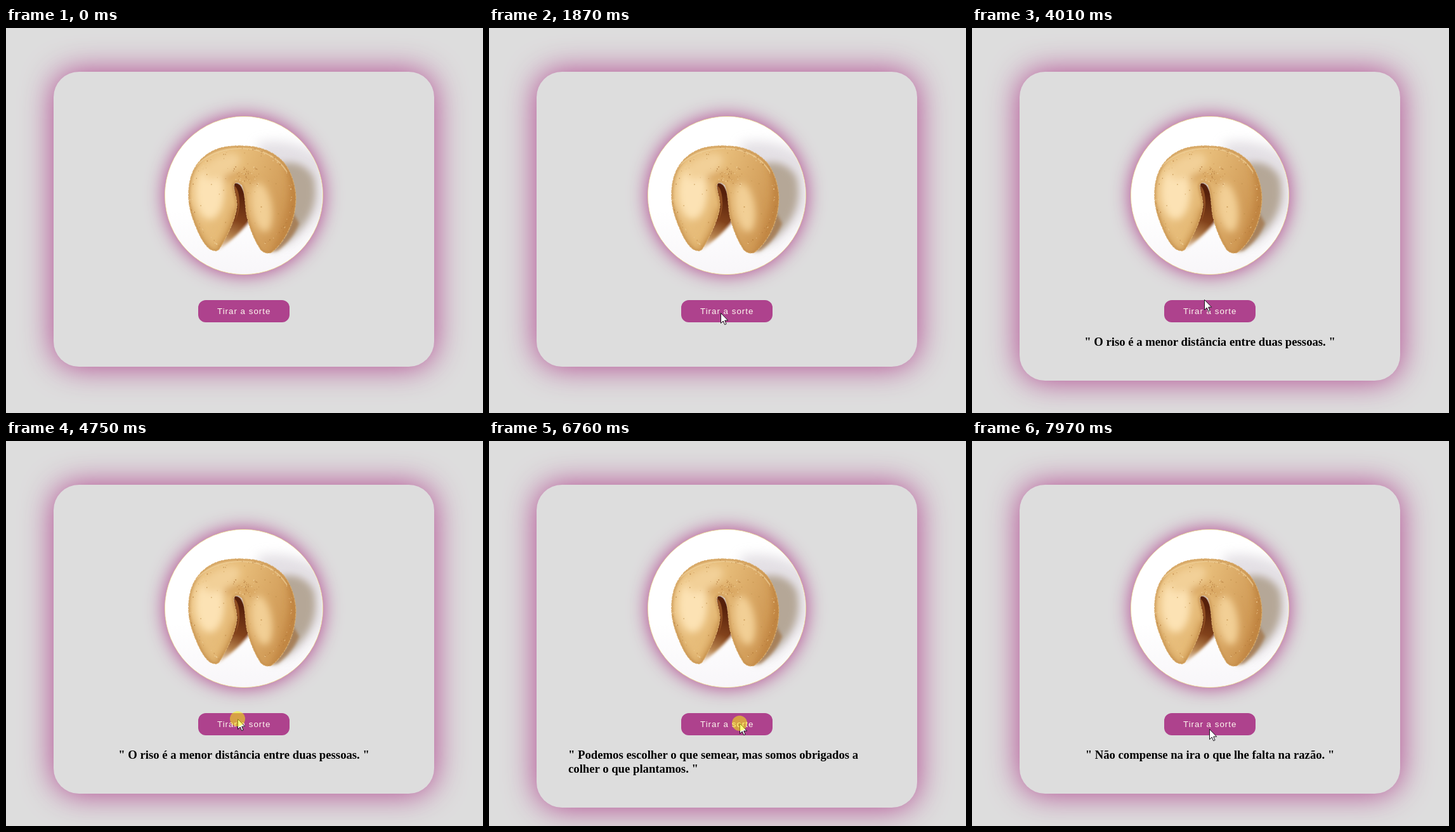
Animation, 752 px wide and 607 px high, one loop 8000 ms. Source, as an HTML page:

```html
<!DOCTYPE html>
<html lang="pt">
<head>
<meta charset="utf-8">
<title>Biscoito da sorte</title>
<style>
  html, body { margin: 0; width: 752px; height: 607px; overflow: hidden; background: #ddd; }
  body { position: relative; }
  .card {
    position: absolute; left: 75px; top: 69px; width: 600px; min-height: 465px;
    box-sizing: border-box; padding: 70px 50px 50px;
    display: flex; flex-direction: column; align-items: center;
    border-radius: 40px; background: #ddd; box-shadow: 0 0 50px #b0428d;
  }
  .plate {
    width: 250px; height: 250px; box-sizing: border-box; flex: none;
    border: 1px solid #eedd9a; border-radius: 50%; overflow: hidden;
    background: #fff; box-shadow: 0 0 30px #b0428d;
  }
  .plate svg { display: block; width: 248px; height: 248px; }
  .button {
    width: 144px; height: 35px; margin: 40px 0 20px; flex: none;
    box-sizing: border-box; padding-left: 30px; border-radius: 12px;
    background: #ae428d; color: #fffaf0; white-space: nowrap;
    font: 13.333px/35px "Liberation Sans", Arial, sans-serif; letter-spacing: 1px;
  }
  .quote {
    margin: 0; color: #000; white-space: nowrap;
    font: bold 18.72px/22px "Liberation Serif", "Times New Roman", serif;
  }
  .quote.long { width: 500px; }
  #pointer { position: absolute; left: 0; top: 0; overflow: visible; }
</style>
</head>
<body>
<div class="card">
  <div class="plate">
    <svg viewBox="251 140 248 248">
      <defs>
        <path id="shape" d="M328 351 C318 350 308 334 301 317 C292 296 287 279 288 258
          C289 234 297 214 316 200 C332 188 352 185 374 186 C399 186 420 194 436 210
          C449 224 456 246 457 267 C457 289 451 309 443 324 C436 337 427 348 418 354
          C411 357 402 352 400 347 C391 333 383 313 379 293 C377 279 377 262 373 250
          C370 243 362 241 359 247 C357 252 365 268 364 282 C361 302 350 326 337 347
          C335 351 331 352 328 351Z"/>
        <clipPath id="inside"><use href="#shape"/></clipPath>
        <linearGradient id="dough" x1="0" y1="0" x2="1" y2=".35">
          <stop offset="0" stop-color="#ecc688"/>
          <stop offset=".5" stop-color="#e6bb78"/>
          <stop offset="1" stop-color="#ce9753"/>
        </linearGradient>
        <linearGradient id="hollow" x1="374" y1="262" x2="340" y2="350" gradientUnits="userSpaceOnUse">
          <stop offset="0" stop-color="#56200b"/>
          <stop offset=".45" stop-color="#82421b"/>
          <stop offset=".75" stop-color="#b98650"/>
          <stop offset="1" stop-color="#ead9c6"/>
        </linearGradient>
        <linearGradient id="base" x1="0" y1="0" x2="0" y2="1">
          <stop offset=".6" stop-color="#fff"/>
          <stop offset="1" stop-color="#f8f6f9"/>
        </linearGradient>
        <filter id="b2" x="-50%" y="-50%" width="200%" height="200%"><feGaussianBlur stdDeviation="2"/></filter>
        <filter id="b6" x="-50%" y="-50%" width="200%" height="200%"><feGaussianBlur stdDeviation="6"/></filter>
        <filter id="b10" x="-50%" y="-50%" width="200%" height="200%"><feGaussianBlur stdDeviation="9"/></filter>
      </defs>
      <rect x="251" y="140" width="248" height="248" fill="url(#base)"/>
      <path d="M395 182 Q450 170 502 206 L504 280 Q486 318 440 345Z" fill="#dad5dc" opacity=".75" filter="url(#b10)"/>
      <path d="M430 214 Q468 206 485 236 Q494 275 472 306 Q452 334 420 353Z" fill="#b5a797" filter="url(#b6)"/>
      <path d="M452 290 Q450 325 416 354 L428 351 Q452 334 462 308Z" fill="#a3764a" opacity=".8" filter="url(#b2)"/>
      <path d="M362 244 Q374 246 377 272 L384 304 Q370 324 334 351 L340 334Z" fill="url(#hollow)" filter="url(#b2)"/>
      <path d="M360 245 Q373 243 377 272 L382 301 Q374 314 357 323 L364 283Z" fill="url(#hollow)"/>
      <path d="M359 248 Q367 252 368 273 Q369 287 362 304 L366 281Z" fill="#8f4e22"/>
      <use href="#shape" fill="url(#dough)"/>
      <g clip-path="url(#inside)">
        <g filter="url(#b6)">
          <ellipse cx="321" cy="259" rx="23" ry="43" fill="#fce2b4"/>
          <ellipse cx="340" cy="218" rx="32" ry="16" fill="#f2d098" transform="rotate(-28 340 218)"/>
          <ellipse cx="403" cy="283" rx="16" ry="39" fill="#f2cf95" transform="rotate(-9 403 283)"/>
          <path d="M440 210 Q462 270 417 358 L465 350 L468 220Z" fill="#bb7c38" opacity=".75"/>
          <path d="M364 285 Q356 321 333 352" fill="none" stroke="#cc9650" stroke-width="9"/>
          <path d="M287 282 Q299 325 327 355" fill="none" stroke="#cf9d58" stroke-width="8"/>
          <path d="M346 239 Q369 225 394 243" fill="none" stroke="#d5a05a" stroke-width="9"/>
        </g>
        <use href="#shape" fill="none" stroke="#c18a48" stroke-width="3" filter="url(#b2)"/>
        <path d="M295 222 Q324 190 370 190 Q420 190 443 227" fill="none" stroke="#f0d19a" stroke-width="2" opacity=".65"/>
        <g id="specks"></g>
      </g>
      <use href="#shape" fill="none" stroke="#d9ac6b" stroke-width="1.2" stroke-dasharray="3 2 5 1"/>
    </svg>
  </div>
  <div class="button">Tirar a sorte</div>
  <h3 class="quote"></h3>
</div>
<svg id="pointer" width="752" height="607">
  <path id="arrow" d="M.5 .5V16.5L4.2 13L6.7 18.7L9.1 17.6L6.7 12.1H11.7Z" fill="#fff" stroke="#17141a" stroke-width="1"/>
  <circle id="press" r="12" fill="#ff0" fill-opacity=".5"/>
</svg>
<script>
const LOOP = 8000;

// Each move: start, step length, then x,y per step.
const moves = [
  [450, 70, "649,567 610,520 570,480 530,450 490,430 455,419 425,417 400,424 378,440 365,449"],
  [3740, 70, "370,443 374,439"],
  [4010, 67, "366,428 345,408 330,396 323,392 327,397 340,412 356,430 365,438"],
  [5210, 68, "350,415 328,388 310,372 299,368 296,379 308,402 345,428 395,442 435,447 448,447 424,446 398,445"],
  [6030, 70, "395,445"],
  [7230, 67, "370,428 325,404 270,394 228,398 213,415 222,440 250,460 290,467 328,465 355,460 369,456 374,454"]
].map(([start, step, path]) => ({ start, step, points: path.split(" ").map(p => p.split(",")) }));

const presses = [[1740, 1870], [2950, 3070], [4750, 4820], [6760, 6890]];

const quotes = [
  [0, ""],
  [1940, '" O riso é a menor distância entre duas pessoas. "'],
  [4820, '" Podemos escolher o que semear, mas somos obrigados a\ncolher o que plantamos. "'],
  [6960, '" Não compense na ira o que lhe falta na razão. "']
];

const arrow = document.getElementById("arrow");
const press = document.getElementById("press");
const quote = document.querySelector(".quote");
quote.style.whiteSpace = "pre";

function addSpecks() {
  let seed = 7;
  const random = () => (seed = seed * 16807 % 2147483647) / 2147483647;
  const dots = [];
  const dot = (x, y, color) =>
    dots.push(`<circle cx="${x.toFixed(1)}" cy="${y.toFixed(1)}" r="${(0.4 + random() * 0.7).toFixed(1)}" fill="${color}" opacity=".7"/>`);
  for (let i = 0; i < 55; i++) {
    const spread = random() + random() - 1;
    dot(374 + spread * 30, 234 + (random() - 0.5) * 30, i % 3 ? "#b37a3c" : "#f6dca9");
  }
  for (let i = 0; i < 110; i++) {
    const a = random() * Math.PI * 2, r = 77 + random() * 6;
    dot(372 + r * Math.cos(a), 270 + r * Math.sin(a), i % 2 ? "#b57c3d" : "#efd09a");
  }
  for (let i = 0; i < 45; i++) dot(300 + random() * 150, 195 + random() * 150, "#c3934f");
  document.getElementById("specks").innerHTML = dots.join("");
}

function pointAt(t) {
  const move = moves.findLast(m => t >= m.start);
  if (!move) return null;
  const i = Math.min(move.points.length - 1, Math.floor((t - move.start) / move.step));
  return move.points[i];
}

function draw() {
  const t = performance.now() % LOOP;
  const point = pointAt(t);
  const pressed = presses.some(([from, to]) => t >= from && t < to);
  arrow.style.display = point ? "" : "none";
  press.style.display = pressed ? "" : "none";
  if (point) {
    const place = `translate(${point})`;
    arrow.setAttribute("transform", place);
    press.setAttribute("transform", place);
  }
  const text = quotes.findLast(q => t >= q[0])[1];
  if (quote.textContent !== text) {
    quote.textContent = text;
    quote.classList.toggle("long", text.includes("\n"));
  }
  requestAnimationFrame(draw);
}

addSpecks();
draw();
</script>
</body>
</html>
```
